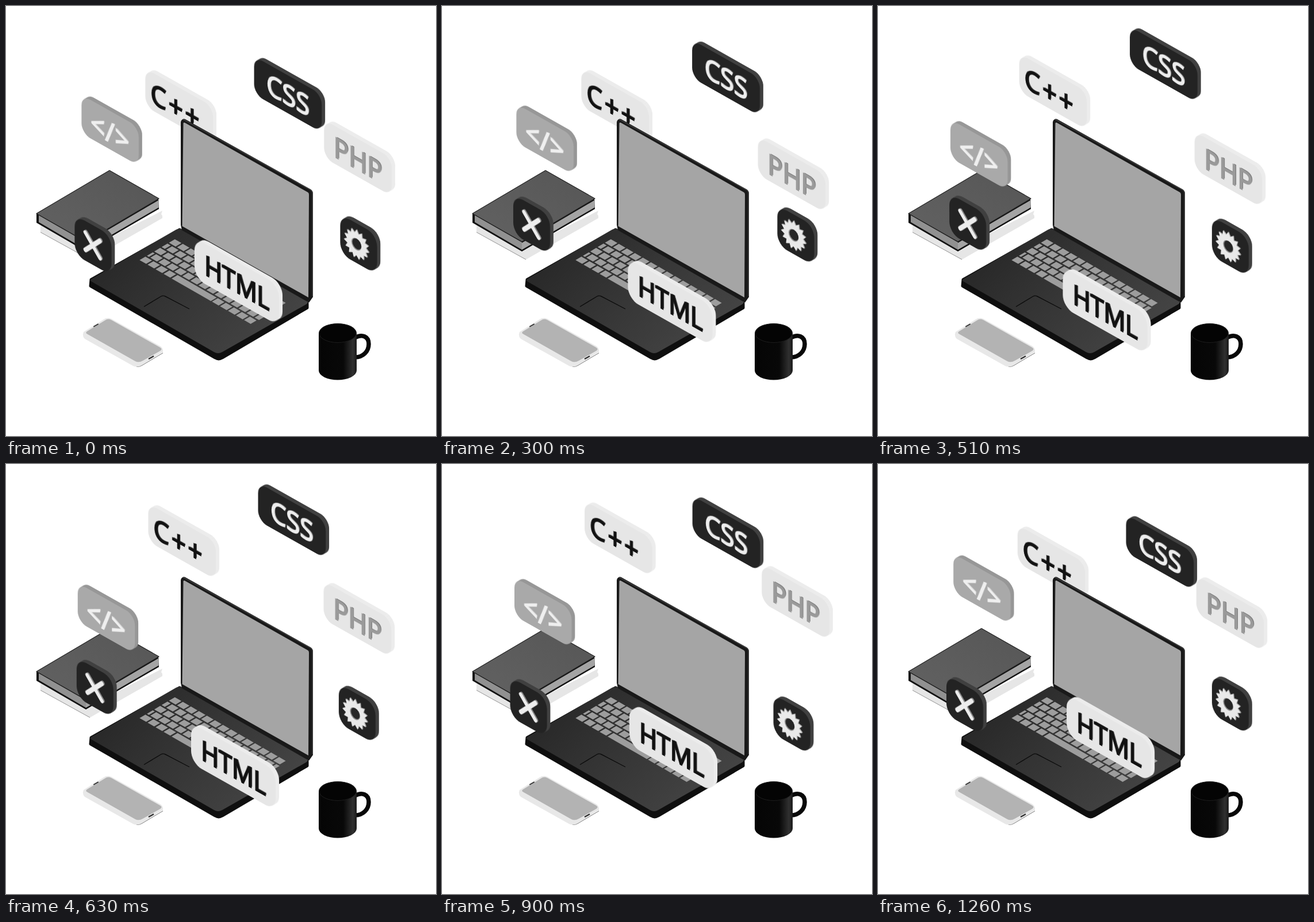
Recreate the animation shown at these times as an HTML page without scripts. Size 748 px wide and 748 px high, loop 1290 ms.

```html
<!DOCTYPE html>
<html lang="en">
<head>
<meta charset="utf-8">
<title>Floating code tiles</title>
<style>
  html, body { margin: 0; width: 100%; height: 100%; overflow: hidden; background: #fff; }
  .stage { position: relative; width: 748px; height: 748px; overflow: hidden; }
  .scene { position: absolute; inset: 0; }

  /* Isometric plate: the stacked shadows form its thickness */
  .tile {
    position: absolute; left: var(--x); top: var(--y);
    width: 136px; height: 66px; border-radius: 18px;
    transform: matrix(.866, .489, 0, 1, 0, 0); transform-origin: 0 0;
    background: var(--face); color: var(--ink);
    box-shadow: 1px -1px var(--side), 2px -2px var(--side), 3px -3px var(--side),
      4px -4px var(--side), 5px -5px var(--side), 6px -6px var(--side), 7px -7px var(--side);
    font: 50px/70px "Open Sans", "Noto Sans", sans-serif;
    text-align: center; white-space: nowrap;
    -webkit-text-stroke: 2px var(--ink);
    text-shadow: 1px -1px var(--edge), 2px -2px var(--edge);
    animation: bob 645ms cubic-bezier(.364, 0, .636, 1) var(--delay) infinite alternate;
  }
  @keyframes bob {
    from { translate: -3.5px 27.7px; }
    to { translate: 3.5px -27.7px; }
  }

  .dark { --face: #232323; --side: #404040; --ink: #ededed; --edge: #8a8a8a; }
  .light { --face: #e6e6e6; --side: #ececec; --ink: #121212; --edge: #3c3c3c; }
  .pale { --face: #e6e6e6; --side: #ececec; --ink: #9a9a9a; --edge: #777; }
  .grey { --face: #a9a9a9; --side: #979797; --ink: #efefef; --edge: #cfcfcf; }

  .cpp { --x: 244.8px; --y: 87.7px; --delay: -1140ms; letter-spacing: 4.5px; text-indent: -13px; }
  .css { --x: 435.3px; --y: 59.7px; --delay: -30ms; line-height: 67px; }
  .php { --x: 552.6px; --y: 200.3px; --delay: -952ms; }
  .html { --x: 324.5px; --y: 426px; --delay: -767ms; width: 170px; height: 70px; border-radius: 21px; font-size: 48px; line-height: 72px; }
  .code { --x: 128px; --y: 180.7px; --delay: -585ms; width: 115px; height: 67px; line-height: 73px; letter-spacing: 1px; }
  .icon { width: 74px; height: 69px; border-radius: 20px; }
  .icon svg { display: block; overflow: visible; }
  .close { --x: 121.3px; --y: 351px; --delay: -226ms; }
  .gear { --x: 579.6px; --y: 373.3px; --delay: -405ms; }
</style>
</head>
<body>
<div class="stage">
  <div class="tile light cpp">C++</div>

  <svg class="scene" viewBox="0 0 748 748" width="748" height="748">
    <defs>
      <linearGradient id="deck" x1="0" y1=".3" x2=".9" y2=".8">
        <stop offset="0" stop-color="#272727"/>
        <stop offset=".35" stop-color="#323232"/>
        <stop offset="1" stop-color="#444"/>
      </linearGradient>
      <linearGradient id="cover" x1="0" y1="1" x2="1" y2="0">
        <stop offset="0" stop-color="#626262"/>
        <stop offset="1" stop-color="#565656"/>
      </linearGradient>
      <linearGradient id="mug">
        <stop offset="0" stop-color="#050505"/>
        <stop offset=".65" stop-color="#080808"/>
        <stop offset=".9" stop-color="#303030"/>
        <stop offset="1" stop-color="#1a1a1a"/>
      </linearGradient>
    </defs>

    <g id="books">
      <path d="M60 380V393L146 441 272 369V365L270 362 272 356 146 420Z" fill="#e6e6e6"/>
      <path d="M60 393.500L146 441" fill="none" stroke="#777" stroke-width=".8"/>
      <path d="M53 361V377L139 427 266 353 265 335Z" fill="#111"/>
      <path d="M57 364L139 411V424L57 376Z" fill="#919191"/>
      <path d="M139 412L266 337.500 265.500 350.500 139 424Z" fill="#a4a4a4"/>
      <path d="M53 361L180 286 266 335 139 410Z" fill="url(#cover)" stroke="#222" stroke-width="1.200" stroke-linejoin="round"/>
    </g>

    <g id="laptop">
      <path d="M148 476L302 389 524 517V525L376 612Q370 616 364 612L147 487Z"
        fill="#0f0f0f" stroke="#0f0f0f" stroke-width="5" stroke-linejoin="round"/>
      <path d="M150 474L296 389Q302 386 308 389L522 512Q527 516 522 519L376 602Q369 606 362 602L150 480Q144 477 150 474Z" fill="url(#deck)"/>
      <g transform="matrix(1 .574 -1 .59 295 405)" stroke="#9d9d9d" stroke-width="10.200" stroke-dasharray="11.500 2.450">
        <path d="M0 6.400H195"/>
        <path d="M0 19.200H195" stroke-dashoffset="6"/>
        <path d="M0 32H195"/>
        <path d="M0 44.800H195" stroke-dashoffset="8"/>
        <path d="M0 57.600H56M126 57.600H195"/>
        <path d="M56 57.600H124" stroke-dasharray="none"/>
      </g>
      <path d="M240 523L269 505.500Q273 503 277 505L319 527" fill="none" stroke="#0b0b0b" stroke-width="1.400"/>
      <path d="M304 202Q305 196 311 196.500L530 319Q534 322 534 326V506L527 516 306 390 304 381Z" fill="#191919"/>
      <path d="M308.500 204Q309 202 311 203L525 324Q527 325 527 328L526 507 306.500 383Z" fill="#a5a5a5"/>
      <path d="M308 197L530 320Q533 322 533 326V505" fill="none" stroke="#3c3c3c" stroke-width="1.500"/>
    </g>

    <g id="phone">
      <path d="M227 627.500Q232 628 236 625.500L273 603.500" fill="none" stroke="#777"/>
      <path d="M135 567L170 545Q176 541 183 544L269 592Q274 596 273 602L234 626Q228 629 221 626L137 579Q132 574 135 567Z" fill="#e8e8e8"/>
      <path d="M141 566L172 547Q177 543 183 546L268 594Q273 597 268 600L238 617Q231 621 225 618L142 571Q137 569 141 566Z" fill="#b3b3b3"/>
      <path d="M153 557.500L160 553.500" stroke="#333" stroke-width="2" stroke-linecap="round"/>
      <path d="M248 614L257 609" stroke="#333" stroke-width="2.500"/>
    </g>

    <g id="cup">
      <path d="M607 577C620 570 631 575 631 588C631 601 621 611 607 611" fill="none" stroke="#080808" stroke-width="7.500"/>
      <path d="M544 569V634A33 16.500 0 0 0 610 634V569Z" fill="url(#mug)"/>
      <ellipse cx="577" cy="569" rx="32.500" ry="16.500" fill="#040404" stroke="#1d1d1d"/>
    </g>
  </svg>

  <div class="tile grey code">&lt;/&gt;</div>
  <div class="tile dark css">CSS</div>
  <div class="tile pale php">PHP</div>
  <div class="tile light html">HTML</div>

  <div class="tile dark icon close">
    <svg viewBox="-37 -34.500 74 69" width="74" height="69">
      <defs>
        <path id="cross" d="M-15.500 -14L13.500 16M13.500 -14L-15.500 16" stroke-width="7.500" stroke-linecap="round"/>
      </defs>
      <use href="#cross" stroke="#8a8a8a" transform="translate(2 -2)"/>
      <use href="#cross" stroke="#ededed"/>
    </svg>
  </div>

  <div class="tile dark icon gear">
    <svg viewBox="-37 -34.500 74 69" width="74" height="69">
      <defs>
        <path id="teeth" d="M0 -25.500L22.100 12.750H-22.100Z"/>
        <g id="wheel">
          <use href="#teeth"/>
          <use href="#teeth" transform="rotate(24)"/>
          <use href="#teeth" transform="rotate(48)"/>
          <use href="#teeth" transform="rotate(72)"/>
          <use href="#teeth" transform="rotate(96)"/>
        </g>
      </defs>
      <g transform="translate(-4.500 2)">
        <use href="#wheel" fill="#a8a8a8" transform="translate(1.500 -1.500)"/>
        <use href="#wheel" fill="#e9e9e9"/>
        <circle r="10" fill="#8a8a8a"/>
        <circle cx="1" cy="-1" r="9" fill="#262626"/>
      </g>
    </svg>
  </div>
</div>
</body>
</html>
```
